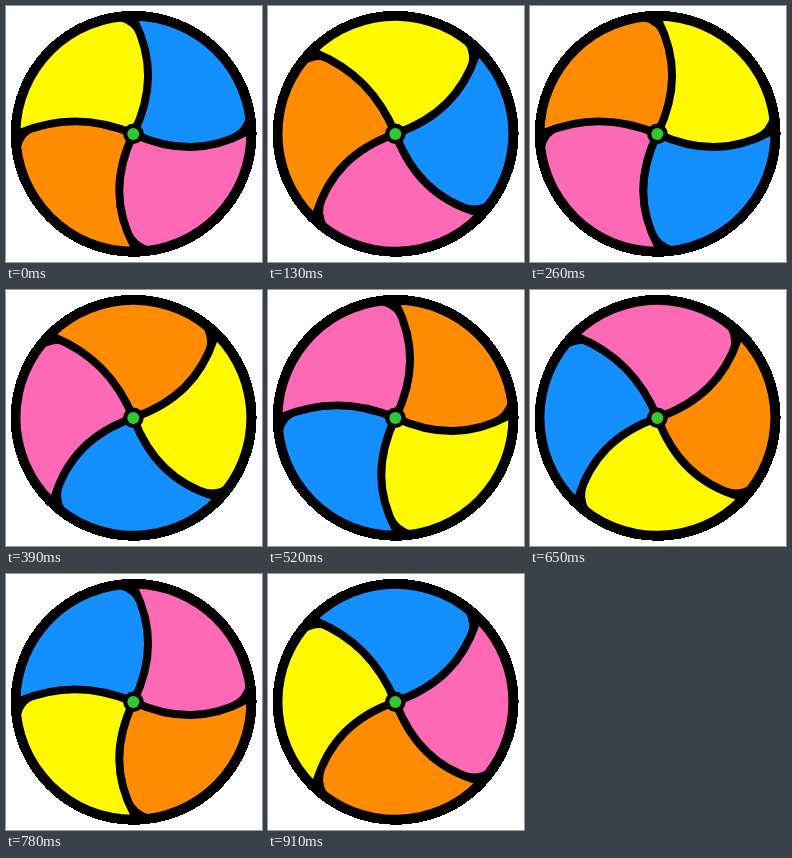
Animation of 256x256 px, one loop 1040 ms. Source, as an HTML page:

```html
<!DOCTYPE html>
<html lang="en">
<head>
<meta charset="utf-8">
<title>Spinning ball</title>
<style>
  html, body { margin: 0; width: 100%; height: 100%; overflow: hidden; background: #fff; }
  svg { display: block; width: 100vw; height: 100vh; }
</style>
</head>
<body>
<svg viewBox="0 0 256 256">
  <circle cx="127.6" cy="127.8" r="123" shape-rendering="crispEdges"/>
  <g id="ball"></g>
  <circle cx="127.3" cy="128" r="6" fill="#32c832"/>
</svg>
<script>
const STEP = 130, STEPS = 8, RIM = 113;
const COLORS = ['#fffa00', '#148fff', '#fd69b5', '#ff8c00'];
const ball = document.getElementById('ball');

// Sideways bend and rim offset of each spoke: left, up, right, down
const spokes = [[16.5, 1], [19.4, 1], [18, -2], [19, -1]].map(([bend, end], i) => {
  const a = (i - 1) * Math.PI / 2, c = Math.cos(a), s = Math.sin(a);
  const at = (x, y) => (x * c - y * s).toFixed(2) + ' ' + (x * s + y * c).toFixed(2);
  return {
    p: at(bend, -40), q: at(bend, -76), rim: at(end, -RIM),
    // rounds the panel corner on the trailing side of the spoke
    fillet: `M${at(end + 4, -96)}Q${at(end - 2, -110)} ${at(end - 16, -RIM)}L${at(end, -RIM - 4)}Z`
  };
});

function add(tag, attrs) {
  const el = document.createElementNS('http://www.w3.org/2000/svg', tag);
  for (const k in attrs) el.setAttribute(k, attrs[k]);
  return ball.appendChild(el);
}

const panels = spokes.map((a, i) => {
  const b = spokes[(i + 1) % 4];
  return add('path', {
    d: `M0 0C${a.p} ${a.q} ${a.rim}A${RIM} ${RIM} 0 0 1 ${b.rim}C${b.q} ${b.p} 0 0Z`
  });
});

for (const { p, q, rim, fillet } of spokes) {
  add('path', { d: `M0 0C${p} ${q} ${rim}`, fill: 'none', stroke: '#000', 'stroke-width': 8, 'stroke-linecap': 'round' });
  add('path', { d: fillet });
}
add('circle', { r: 10.3 });

function draw(now) {
  const n = Math.floor(now / STEP) % STEPS;
  const turn = n >> 1;
  ball.setAttribute('transform', `translate(127.4 127.8) rotate(${n % 2 * 45})`);
  panels.forEach((el, i) => el.setAttribute('fill', COLORS[(i - turn + 4) % 4]));
}

let start;
function tick(now) {
  start ??= now;
  draw(now - start);
  requestAnimationFrame(tick);
}
draw(0);
requestAnimationFrame(tick);
</script>
</body>
</html>
```
